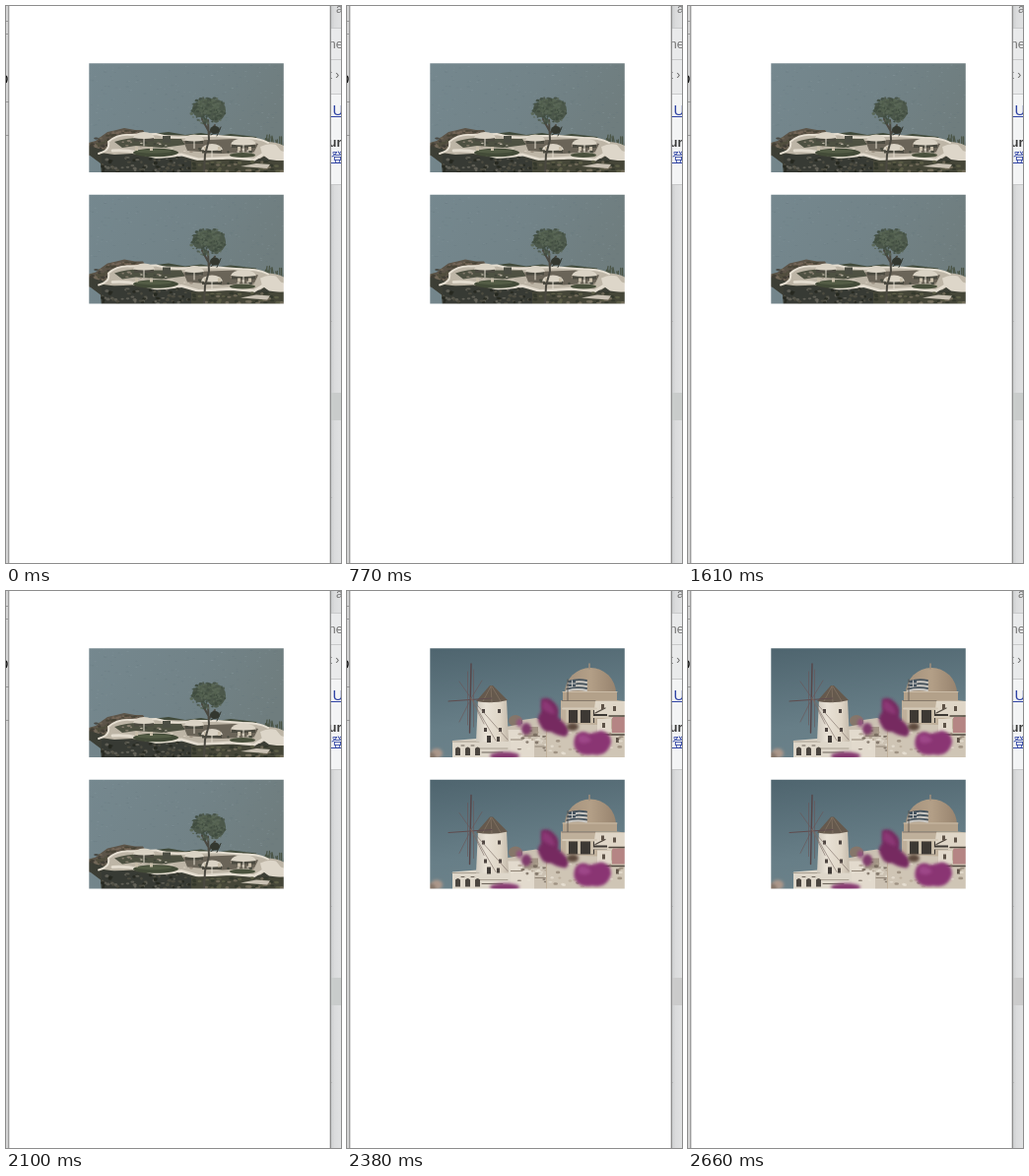
Animation of 340x566 px, one loop 2.73 s. Source, as an HTML page:

```html
<!DOCTYPE html>
<html lang="en">
<head>
<meta charset="utf-8">
<title>Two pictures</title>
<style>
html, body { margin: 0; width: 100%; height: 100%; overflow: hidden; background: #fff; }
svg { display: block; width: 340px; height: 566px; }
text { font-family: "Liberation Sans", "Noto Sans CJK JP", "Noto Sans CJK", sans-serif; }
</style>
</head>
<body>
<svg id="stage" viewBox="0 0 340 566" xmlns="http://www.w3.org/2000/svg">
  <defs>
    <linearGradient id="water" x1="0" y1="0" x2="1" y2=".35">
      <stop offset="0" stop-color="#75888f"/><stop offset=".55" stop-color="#728388"/><stop offset="1" stop-color="#6f7d7e"/>
    </linearGradient>
    <linearGradient id="sky" x1="0" y1="0" x2=".25" y2="1">
      <stop offset="0" stop-color="#4d636d"/><stop offset=".7" stop-color="#677e87"/><stop offset="1" stop-color="#6c828a"/>
    </linearGradient>
    <linearGradient id="tower">
      <stop offset="0" stop-color="#cfc9be"/><stop offset=".3" stop-color="#e8e1d5"/><stop offset=".75" stop-color="#ded5c6"/><stop offset="1" stop-color="#c4baab"/>
    </linearGradient>
    <linearGradient id="dome">
      <stop offset="0" stop-color="#a4917c"/><stop offset=".5" stop-color="#b39f87"/><stop offset="1" stop-color="#97836e"/>
    </linearGradient>
    <linearGradient id="side">
      <stop offset="0" stop-color="#c9cbcc"/><stop offset=".4" stop-color="#dadbdc"/><stop offset="1" stop-color="#e0e1e2"/>
    </linearGradient>
    <filter id="soft" x="-30%" y="-30%" width="160%" height="160%"><feGaussianBlur stdDeviation="1.5"/></filter>
    <filter id="lens"><feGaussianBlur stdDeviation=".45"/></filter>
    <clipPath id="frame"><rect x="84.3" y="58.3" width="197.500" height="110.700"/></clipPath>
    <g id="island" clip-path="url(#frame)"><g id="islandArt" filter="url(#lens)"></g></g>
    <g id="mill" clip-path="url(#frame)"><g id="millArt" filter="url(#lens)"></g></g>
  </defs>
  <rect width="340" height="566" fill="#fff"/>

  <rect width="3" height="566" fill="#d4d4d4"/>
  <path d="M0 15.500H2M0 28.500H2M0 97.500H3M0 131.500H3" stroke="#999"/>
  <path d="M0 71Q2 73.500 0 78" fill="none" stroke="#111" stroke-width="1.500"/>
  <path d="M2.800 0V566" stroke="#858585"/>

  <rect x="329" width="11" height="566" fill="url(#side)"/>
  <rect x="329" y="22" width="11" height="67" fill="#e9eaeb"/>
  <rect x="329" y="89" width="11" height="92" fill="#f3f4f5"/>
  <path d="M329 22.500H340M329 54.500H340M329 89.500H340M329 181.500H340" stroke="#c9cacb"/>
  <rect id="band" x="329" y="393" width="11" height="28"/>
  <path d="M329 320.500H331M329 499.500H331" stroke="#bbb"/>
  <text x="335" y="7" font-size="12" fill="#777">a</text>
  <text x="327.500" y="43" font-size="13" fill="#777">ne</text>
  <text x="327.500" y="74" font-size="12" fill="#666">t ›</text>
  <text x="331.500" y="111" font-size="15" fill="#2f43a4">U</text>
  <text x="327.500" y="143" font-size="13" font-weight="bold" fill="#3c3c3c">ur</text>
  <text x="330" y="158" font-size="13" fill="#2f43a4">登</text>
  <path d="M329 112.500H340M330 159.500H340" stroke="#2f43a4"/>
  <rect x="322" width="7" height="566" fill="#fff"/>
  <path d="M329.300 0V566" stroke="#858585" stroke-width="1.200"/>

  <g id="photos"><use/><use y="133.500"/></g>
</svg>
<script>
const LOOP = 2730, CUT = 2170;
const NS = "http://www.w3.org/2000/svg";
const get = id => document.getElementById(id);
let target;

function add(tag, attrs) {
  const el = document.createElementNS(NS, tag);
  for (const k in attrs) el.setAttribute(k, attrs[k]);
  target.appendChild(el);
}
const shape = (fill, d, more) => add("path", { fill, d, ...more });
const line = (stroke, width, d) =>
  add("path", { d, stroke, "stroke-width": width, fill: "none", "stroke-linecap": "round" });
const oval = (fill, cx, cy, rx, ry, more) => add("ellipse", { fill, cx, cy, rx, ry, ...more });
const box = (fill, x, y, width, height) => add("rect", { fill, x, y, width, height });

let seed = 7;
const rnd = () => (seed = seed * 16807 % 2147483647) / 2147483647;
const between = (a, b) => a + (b - a) * rnd();

// random specks inside a box
function specks(n, colors, x0, y0, x1, y1, rx, ry, opacity) {
  for (let i = 0; i < n; i++)
    oval(colors[i % colors.length], between(x0, x1).toFixed(1), between(y0, y1).toFixed(1),
      between(rx / 2, rx).toFixed(2), between(ry / 2, ry).toFixed(2), { opacity });
}

function parasol(x, y, w) {
  box("#4b4a40", x - w + 1, y + 2, 2 * w - 2, 3.5);
  line("#e6dfd1", 1, `M${x} ${y}V${y + 10}`);
  shape("#dad3c5", `M${x - w} ${y + 2}Q${x - w + 2} ${y - 3.5} ${x} ${y - 4}Q${x + w - 2} ${y - 3.5} ${x + w} ${y + 2}Q${x} ${y + 4} ${x - w} ${y + 2}Z`);
}

function drawIsland() {
  target = get("islandArt");
  box("url(#water)", 80, 54, 206, 119);
  specks(260, ["#8c9da3", "#64757c"], 84, 59, 282, 133, 1.6, .5, .4);

  // rocks and planting behind the terrace
  shape("#5c5448", "M84 139L91 137 96 133 103 128 112 126 120 124 131 126 139 126 143 132 150 140 110 152H84Z");
  specks(45, ["#3d3a32", "#756a5b", "#4c4b3a"], 86, 134, 106, 149, 2.5, 1.6, .8);
  specks(26, ["#474336", "#78695a"], 103, 127, 135, 132, 2.5, 1.3, .8);
  shape("#414a3a", "M148 130L165 128 182 131 198 129 214 132 228 130 254 133 258 141H148Z");
  for (let i = 0; i < 13; i++) {
    const x = 261 + i * 1.7;
    line("#4b5547", 1.3, `M${x} 147L${x + between(-3, 3)} ${between(131, 137)}`);
  }
  shape("#3c3e35", "M84 142L98 146 140 150 198 154 282 147V173H97L96 160 84 151Z");

  // terrace
  shape("#bdb5a6", "M96 149Q105 146 103 138Q110 131 123 130L160 131 198 132 240 133Q256 133 264 138Q275 138 282 142V152L266 150 258 155 232 154 196 156 176 151 150 153 128 150 110 151Z");
  shape("#4e5142", "M110 138Q128 132 150 135L178 135 182 141 158 144 132 142 118 144Z");
  shape("#6a6458", "M180 137L232 135 256 140 252 148 220 150 184 147Z");
  specks(40, ["#d9d1c2", "#3f4238", "#95897a"], 114, 137, 254, 149, 2.2, 1.2, .8);
  line("#e6dfd2", 1.9, "M94 150Q106 147 104 138Q113 130 126 131L152 130Q171 136 190 132L214 132 240 134Q258 134 266 139");
  line("#e3dccf", 2.8, "M108 147Q122 146 134 149L154 154 178 151 196 156 228 154 252 156 262 150");
  shape("#ddd6c9", "M258 143Q266 139 274 141L279 147 282 148V158L267 156 260 151Z");

  // stone wall below
  shape("#373a34", "M97 151L122 151 150 155 177 154 190 159 188 173H97Z");
  specks(75, ["#65645a", "#24271f", "#504f43"], 98, 154, 186, 169, 2.2, 1.6, .85);
  shape("#454638", "M188 157L228 156 252 158 282 157V173H188Z");
  specks(50, ["#5f6048", "#303529", "#78715f"], 190, 158, 281, 169, 3, 1.7, .8);
  shape("#c9c1b3", "M238 163L254 160 268 161 265 165Z");
  oval("#434b38", 152, 149, 23, 4.2);
  oval("#535c45", 150, 147.7, 18, 2);
  oval("#4a513d", 240, 151.5, 13, 2.5);
  box("#4b4d43", 159, 132, 8, 7);

  parasol(140, 132, 11);
  parasol(191, 134.5, 10);
  parasol(241, 138.5, 13);
  parasol(209, 144, 11);
  for (const x of [131, 146, 201, 215, 235, 246]) box("#c7bda9", x, 143, 3, 4);

  // olive tree
  line("#4a4840", 2, "M205 116L206 136 202 151 201 169M206 130L212 121M205 126L199 115");
  oval("#4c584b", 197, 105, 8, 8);
  oval("#4c584b", 213, 106, 10, 11);
  oval("#53604f", 205, 102, 12, 8);
  for (let i = 0; i < 170; i++) {
    const a = rnd() * 6.283, r = Math.sqrt(rnd());
    oval(["#3f4b40", "#5a6757", "#4b574a"][i % 3], 205.5 + Math.cos(a) * r * 18,
      106 + Math.sin(a) * r * 14, between(.7, 2), between(.6, 1.5), { opacity: .85 });
  }
  oval("#33372f", 212, 126, 5, 4);
  line("#33372f", 1, "M208 131L217 126M214 132L218 123");
}

function drawMill() {
  target = get("millArt");
  box("url(#sky)", 80, 54, 206, 119);

  // middle houses
  oval("#85766a", 171, 132, 7, 6);
  shape("#cbc1b2", "M161 138L178 135V131L192 129 204 134 222 131V173H161Z");
  shape("#e2dacd", "M162 141H178V150H190V173H162Z");
  box("#a39686", 180, 138, 14, 9);
  line("#8f8375", 1, "M163 151H178M180 147.500H202M191 158H204");
  specks(26, ["#e6dfd2", "#6d6155", "#a99c8b"], 164, 142, 204, 163, 2.4, 1.5, .75);

  // church
  shape("#bfb09b", "M217 111H274L282 112V173H202V139L217 133Z");
  shape("url(#dome)", "M221 104A26 26 0 0 1 273 104Z");
  box("#b3a18a", 219, 102, 55, 9);
  line("#cbbca7", 1, "M219 102.500H274");
  line("#85786a", 1, "M218 111.500H252");
  line("#a08f7d", 1.5, "M246 74V79");
  shape("#dfd6c7", "M252 112H282V126L268 130 250 128Z");
  shape("#cfc5b5", "M203 143L222 135 254 136 282 144V173H203Z");
  box("#b58584", 269, 128, 15, 16);
  box("#e2d9cb", 254, 130, 14, 13);
  shape("#3d3934", "M223 121H251V125H264V129H251V134H223Z");
  for (const x of [222, 234, 247]) box("#c9bda9", x, 120, 3, 14);
  line("#d6cbb9", 2, "M219 119.500H253M250 128H269");
  line("#4f483f", 1.3, "M252 124L262 119M266 127H282M256 146H282");
  for (const [x, y] of [[258, 115], [270, 117], [259, 134], [273, 149]]) box("#5e5348", x, y, 3, 5);
  specks(30, ["#e9e2d6", "#8b7d6d", "#b3a593"], 205, 143, 280, 167, 2.6, 1.5, .7);

  // striped flag
  for (let i = 0; i < 6; i++)
    line(i % 2 ? "#c9c8c4" : "#46545f", 2, `M${225 - i * .4} ${92 + i * 1.9}Q234 ${89 + i * 2} 243 ${91 + i * 2}`);
  box("#46545f", 225, 91, 7, 6);
  line("#c9c8c4", 1, "M228.500 91V97M225 94H232");
  line("#554e49", .8, "M224 90V111");

  // low wall
  shape("#ded7ca", "M107 152L132 150H166V173H107Z");
  line("#a79e90", 1, "M107 153H134M133 160H163");
  for (const x of [110, 120, 130]) shape("#4a453f", `M${x} 167V160Q${x + 2.5} 157 ${x + 5} 160V167Z`);
  line("#6d655b", 1, "M116 157H119M126 157H129M137 164H158");

  // windmill
  shape("url(#tower)", "M133 110H162L164 153H131Z");
  shape("#65594d", "M131 112L145 96H148L163 111Q147 115 131 112Z");
  line("#8b7b6b", .6, "M146 97L138 112M146 97L147 113M147 97L156 112");
  for (const [x, y] of [[137, 120], [153, 120], [139, 139], [154, 139]]) box("#4d4541", x, y, 3, 4);
  box("#3f3a36", 142, 147, 4, 7);
  box("#4b443e", 152, 148, 3, 5);
  line("#574548", 1.4, "M126 74L124.500 144");
  line("#5f4c4e", 1.1, "M103 112L147 109");
  line("#6a5557", .6, "M126 109L114 92M126 109L137 91M126 109L114 133M128.500 80V138M122.500 82V136");
  line("#7a6a63", .6, "M126 109L139 135M126 109L163 151M126 109L151 152");

  // blurred blossom in front
  const soft = { filter: "url(#soft)" };
  shape("#762c61", "M197 110Q204 106 211 114Q216 119 214 128L223 137Q227 143 222 148Q213 147 207 143Q199 144 196 136Q191 129 197 123Z", soft);
  shape("#8b3874", "M199 111Q209 114 211 125Q204 125 198 119Z", soft);
  shape("#8a3473", "M232 147Q238 140 246 145L258 142Q268 144 268 154Q264 169 249 166Q238 168 233 162Q228 156 232 147Z", soft);
  shape("#9d4788", "M235 147Q243 144 248 152Q241 157 235 153Z", soft);
  oval("#7f3a6c", 182, 140, 5, 6, soft);
  oval("#93517f", 175, 134, 3, 4, soft);
  oval("#5d4a3c", 229, 138, 6, 4, soft);
  oval("#85386f", 160, 167.500, 15, 4, soft);
  oval("#ab978a", 91, 165, 6, 5, soft);
  oval("#857468", 85, 169, 5, 5, soft);
}

drawIsland();
drawMill();
const views = document.querySelectorAll("#photos use");

function render(t) {
  const late = t >= CUT;
  for (const v of views) v.setAttribute("href", late ? "#mill" : "#island");
  get("band").setAttribute("fill", late ? "#cbcbcb" : "#c9cccb");
}

const start = performance.now();
function tick() {
  render((performance.now() - start) % LOOP);
  requestAnimationFrame(tick);
}
tick();
</script>
</body>
</html>
```
